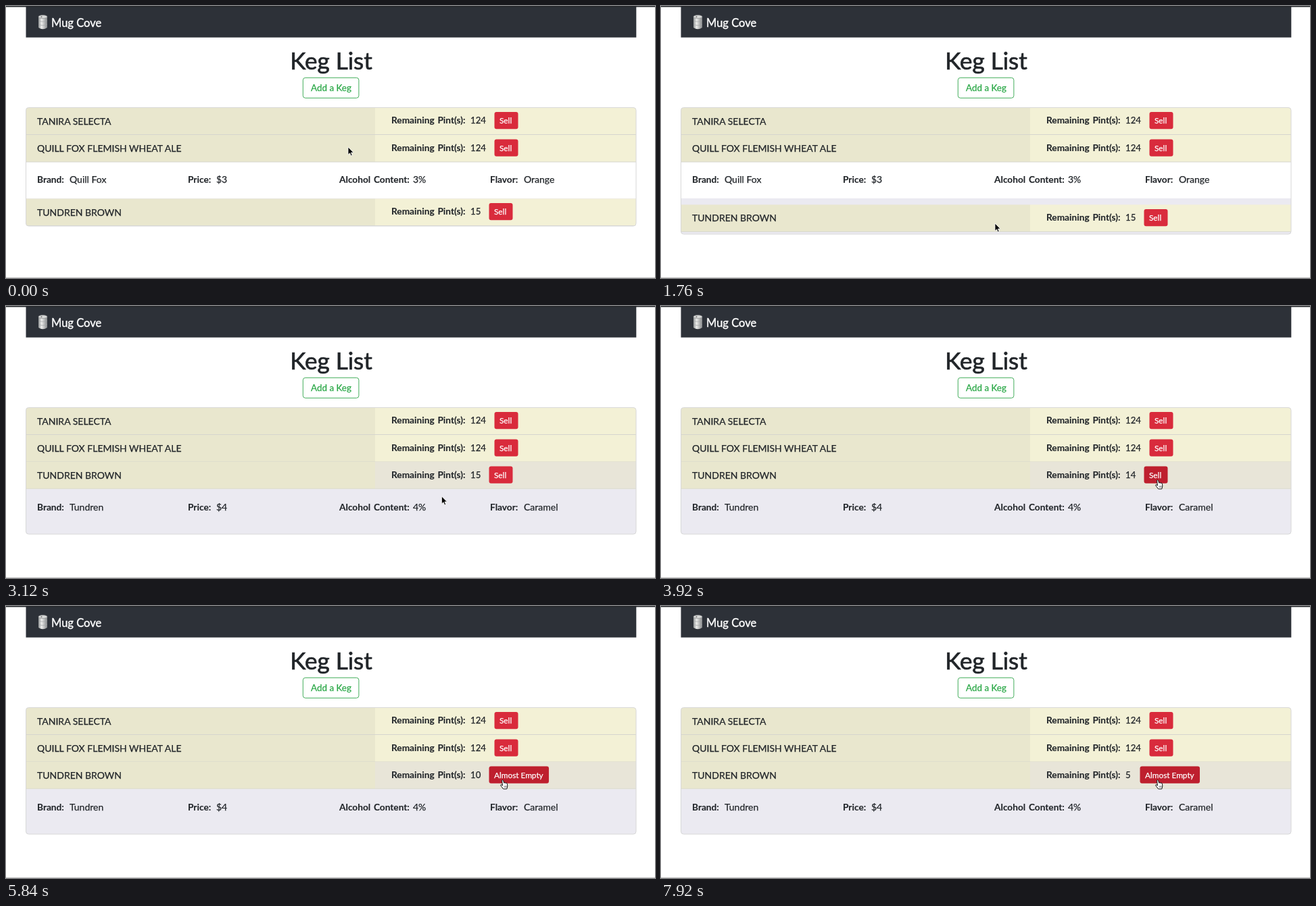
An HTML page that plays this animation: 960 px wide and 403 px high, repeating every 8 s.

```html
<!DOCTYPE html>
<html lang="en">
<head>
<meta charset="utf-8">
<title>Keg List</title>
<style>
  html, body { margin: 0; width: 100%; height: 100%; overflow: hidden; background: #fff; }
  svg { display: block; width: 960px; height: 403px; }
  text {
    font: 14px "Comic Sans MS", Lato, "Open Sans", sans-serif;
    color: #212529; fill: currentColor; stroke: currentColor; stroke-width: .25px;
  }
  .bold { font-weight: 700; font-size: 13.7px; word-spacing: .1em; stroke-width: .1px; }
  .num { font-size: 13.2px; }
  .btn { font-size: 11.8px; color: #fff; }
  .brand { font-size: 16.5px; color: #fff; stroke-width: .4px; }
  .title { font-size: 35px; stroke-width: .7px; }
  .add { font-size: 13.4px; color: #28a745; }
</style>
</head>
<body>
<svg viewBox="0 0 960 403" xmlns="http://www.w3.org/2000/svg">
  <defs>
    <linearGradient id="steel">
      <stop offset="0" stop-color="#8f9294"/>
      <stop offset=".35" stop-color="#eeeeec"/>
      <stop offset="1" stop-color="#858789"/>
    </linearGradient>
    <clipPath id="cardClip"><rect id="cardShape" x="29.5" y="150.5" width="902.5" height="175.5" rx="4"/></clipPath>
    <clipPath id="openClip"><rect id="openShape" x="29" width="903" height="0"/></clipPath>
  </defs>

  <rect width="960" height="403" fill="#fff"/>
  <rect x="29.5" width="902.8" height="46.6" fill="#2d3138"/>
  <rect width="960" height="1.5" fill="#26282c"/>
  <rect y="402" width="960" height="1" fill="#c4c4c4"/>

  <g id="drum">
    <path d="M48 16V32Q54.5 36.5 61 32V16Z" fill="url(#steel)"/>
    <ellipse cx="54.5" cy="16" rx="6.5" ry="2.4" fill="#d9dad9" stroke="#8b8d8f" stroke-width=".8"/>
    <path d="M48 21.5Q54.5 25 61 21.5M48 27Q54.5 30.5 61 27" fill="none" stroke="#a3a5a6" stroke-width=".7"/>
    <circle cx="52.5" cy="16" r="1" fill="#777"/>
  </g>
  <text class="brand" x="67" y="31">Mug Cove</text>
  <text class="title" x="481" y="94" text-anchor="middle">Keg List</text>
  <rect x="439.3" y="106.3" width="82.6" height="30" rx="3.5" fill="#fff" stroke="#43ad5b"/>
  <text class="add" x="481" y="126.3" text-anchor="middle">Add a Keg</text>

  <g id="card" clip-path="url(#cardClip)"></g>
  <rect id="cardEdge" x="29.5" y="150.5" width="902.5" height="175.5" rx="4" fill="none" stroke="#d8d8d8"/>

  <path id="arrow" d="M0 0V11.3L2.6 8.9L4.4 13L6.2 12.2L4.5 8.2H8Z" fill="#000" stroke="#fff" stroke-width=".8"/>
  <g id="hand">
    <path d="M2.5 1.3Q3.6 .2 4.6 1.5L5.7 5.2Q6.7 4.3 7.4 5.2Q8.4 4.5 9 5.5Q10.3 5.2 10.5 6.8L10.8 10L9.8 14H4.6L1 9.3Q.2 7.7 1.7 7.7L3.5 9Z"
      fill="#fff" stroke="#111" stroke-linejoin="round"/>
    <path d="M6 9.5V12M7.6 9.3V12M9.1 9.3V12" stroke="#333" stroke-width=".6"/>
  </g>
</svg>
<script>
const LOOP = 8000, STEP = 80;
const OPEN_AT = 1740, OPEN_MS = 350, BODY = 64;
const ROW = 40, SLOT = 231;
const HOVER_AT = 3380;
const CLICKS = [3800, 4330, 4800, 5280, 5750, 6250, 6700, 7080, 7430, 7780];
const START_PINTS = 15, LOW = 10;
const CREAM = "#f3f1d6", LILAC = "#ebeaf1", RED = "#d92b3c";

const $ = id => document.getElementById(id);
const card = $("card");

function add(parent, tag, attrs, content) {
  const el = document.createElementNS("http://www.w3.org/2000/svg", tag);
  set(el, attrs);
  if (content !== undefined) el.textContent = content;
  parent.appendChild(el);
  return el;
}
function set(el, attrs) {
  for (const key in attrs) el.setAttribute(key, attrs[key]);
}
const rect = (parent, x, y, width, height, fill) =>
  add(parent, "rect", { x, y, width, height, fill });
const label = (parent, x, y, content, cls = "") =>
  add(parent, "text", { x, y, class: cls }, content);
const place = (el, x, y) => set(el, { transform: `translate(${x} ${y})` });
const clamp = v => Math.max(0, Math.min(1, v));
const lerp = (a, b, k) => a + (b - a) * k;
const smooth = k => k * k * (3 - 2 * k);
const span = (t, from, to) => smooth(clamp((t - from) / (to - from)));

function makeRow(name, pints, y) {
  const g = add(card, "g", {});
  place(g, 0, y);
  rect(g, 29, 0, 517, ROW, "#e9e7ce");
  const tint = rect(g, 546, 0, 386, ROW, CREAM);
  rect(g, 29, ROW - .5, 903, 1, "#d5d5ce");
  label(g, 46, 25, name);
  label(g, 570, 23.5, "Remaining Pint(s):", "bold");
  const num = label(g, 687, 23.5, pints, "num");
  const x = pints > 99 ? 722.5 : 714.5;
  const box = add(g, "rect", { x, y: 6.5, width: 35, height: 25.3, rx: 3, fill: RED });
  const word = label(g, x + 7.5, 23.7, "Sell", "btn");
  return { g, tint, num, box, word };
}

function makeBody(parent, brand, price, alcohol, flavor) {
  const g = add(parent, "g", {});
  const cells = [
    [46, "Brand:", 94, brand], [269, "Price:", 311, price],
    [493, "Alcohol Content:", 602, alcohol], [716, "Flavor:", 766, flavor]
  ];
  for (const [x, key, vx, value] of cells) {
    label(g, x, 31, key, "bold");
    label(g, vx, 31, value);
  }
  return g;
}

rect(card, 29, 150, 903, 190, LILAC);
rect(card, 29, SLOT, 903, 54, "#fff");
place(makeBody(card, "Quill Fox", "$3", "3%", "Orange"), 0, SLOT);
makeRow("TANIRA SELECTA", 124, 150.5);
makeRow("QUILL FOX FLEMISH WHEAT ALE", 124, 191);
const last = makeRow("TUNDREN BROWN", START_PINTS, 285);
const under = rect(card, 29, 0, 903, 110, LILAC);
const opened = makeBody(add(card, "g", { "clip-path": "url(#openClip)" }), "Tundren", "$4", "4%", "Caramel");

function drawAccordion(t) {
  const started = t >= OPEN_AT;
  const k = span(t, OPEN_AT, OPEN_AT + OPEN_MS);
  const y = started ? SLOT + BODY * (1 - k) : 285.5;
  const height = started ? 187.5 : 175.5;
  const bottom = y + ROW + .5;
  place(last.g, 0, y);
  set(last.tint, { fill: k > 0.1 ? "#e8e5d8" : CREAM });
  set(under, { y: bottom });
  place(opened, 0, bottom);
  set($("openShape"), { y: bottom, height: BODY * k });
  set($("cardShape"), { height });
  set($("cardEdge"), { height });
}

function drawButton(t) {
  const pints = START_PINTS - CLICKS.filter(c => t >= c).length;
  const low = pints <= LOW;
  const x = pints < 10 ? 708.5 : 714.5;
  // The ring shows while the button is pressed, then fades.
  const ring = Math.max(...CLICKS.map(c => t < c ? clamp((t - c + 130) / 80) : clamp(1 - (t - c) / 120)));
  last.num.textContent = pints;
  last.word.textContent = low ? "Almost Empty" : "Sell";
  set(last.word, { x: x + 7.5 });
  set(last.box, {
    x, width: low ? 88.5 : 35,
    fill: t >= HOVER_AT ? "#be1f2e" : RED,
    stroke: "#e8747e", "stroke-width": 2.5 * ring, "stroke-opacity": ring
  });
}

function drawPointer(t) {
  const down = span(t, 80, 800), over = span(t, 2640, 3460);
  const x = lerp(lerp(506, 494, down), 734, over);
  const y = lerp(lerp(209, 322, down), 258, over);
  const hand = t >= HOVER_AT;
  place($("arrow"), x, y);
  place($("hand"), x - 3, y - 1);
  set($("arrow"), { visibility: hand ? "hidden" : "visible" });
  set($("hand"), { visibility: hand ? "visible" : "hidden" });
}

function draw(t) {
  drawAccordion(t);
  drawButton(t);
  drawPointer(t);
}

const begin = performance.now();
function tick() {
  const t = (performance.now() - begin) % LOOP;
  draw(Math.floor(t / STEP) * STEP);
  requestAnimationFrame(tick);
}
draw(0);
requestAnimationFrame(tick);
</script>
</body>
</html>
```
